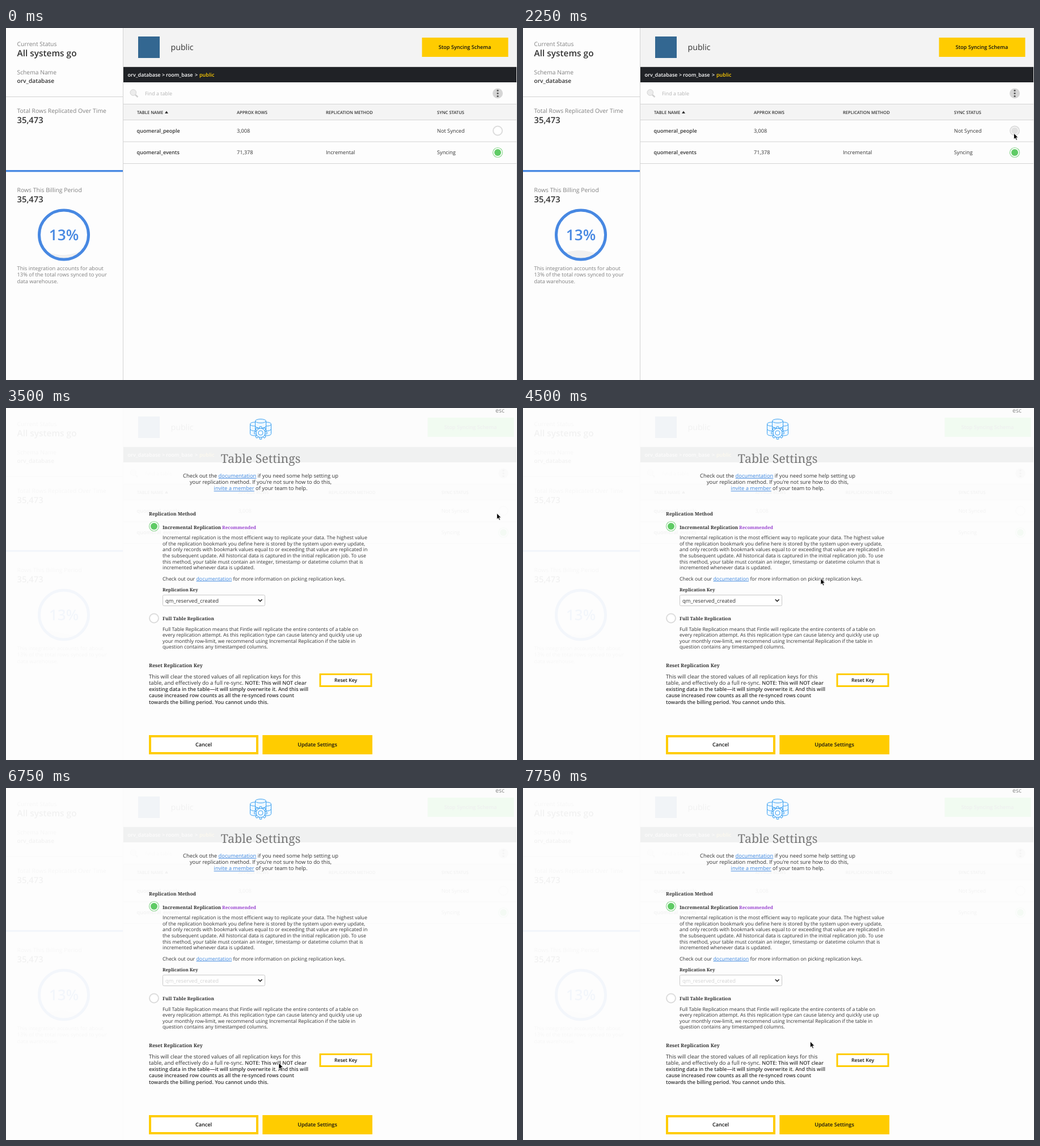
Recreate the animation shown at these times as an HTML page. Size 901 by 622 pixels, loop 8 s.

```html
<!DOCTYPE html>
<html lang="en">
<head>
<meta charset="utf-8">
<title>Table settings</title>
<style>
html, body { margin: 0; width: 100%; height: 100%; overflow: hidden; background: #fdfdfd; }
svg { display: block; width: 100%; height: 100%; }
text { font-family: "Open Sans", "Noto Sans", sans-serif; fill: #333; text-rendering: geometricPrecision; white-space: pre; }
.bold { font-weight: 600; }
.slab { font-family: "Noto Serif", serif; font-weight: 700; }
.title { font-family: "Noto Serif", serif; fill: #777; }
.soft { fill: #808080; }
.faint { fill: #b4b4b4; }
.pale { fill: #d2d2d2; }
.mid { text-anchor: middle; }
.black { fill: #111; }
.link { fill: #3b86e0; text-decoration: underline; }
</style>
</head>
<body>
<svg id="stage" viewBox="0 0 901 622"></svg>
<script>
const LOOP = 8000, STEP = 250;
const BLUE = '#4788e2', GREEN = '#5fcb65', YELLOW = '#fc0';

const text = (x, y, size, str, cls = '', extra = '') =>
  `<text x="${x}" y="${y}" font-size="${size}" class="${cls}" ${extra}>${str}</text>`;
const lines = (x, y, size, pitch, rows, cls) =>
  rows.map((row, i) => text(x, y + i * pitch, size, row, cls)).join('');
const rect = (x, y, w, h, fill, extra = '') =>
  `<rect x="${x}" y="${y}" width="${w}" height="${h}" fill="${fill}" ${extra}/>`;
const circle = (x, y, r, fill, extra = '') =>
  `<circle cx="${x}" cy="${y}" r="${r}" fill="${fill}" ${extra}/>`;
const path = (d, extra) => `<path d="${d}" ${extra}/>`;
const group = (id, body) => `<g id="${id}">${body}</g>`;
const link = str => `<tspan class="link">${str}</tspan>`;

const radio = (x, y, on) => on
  ? circle(x, y, 8.5, '#fff', 'stroke="#8ed692" stroke-width="1.2"') + circle(x, y, 6, GREEN)
  : circle(x, y, 8, '#fff', 'stroke="#dcdcdc" stroke-width="2"');

function dashboard(shift, buttonFill) {
  const col = x => x + (x - 231) * shift * 0.00145;
  const right = x => x + shift;
  const rowLine = y => rect(207, y, 694, 1, '#d4d4d4');
  const row = (y, name, count, method, status, on) =>
    text(230.5, y + 3.2, 9.1, name, 'bold') + text(col(407), y + 3.2, 9.2, count) +
    text(col(564), y + 3.2, 9.2, method) + text(col(760), y + 3.2, 9.2, status) +
    radio(right(867), y, on);
  const head = (x, str) => text(col(x), 151.6, 7.6, str, 'bold');
  const crumb = (x, str, fill = '#fff') => text(x, 85.5, 9, str, 'bold', `style="fill:${fill}"`);

  return rect(207, 0, 693, 68, '#f3f3f3') + rowLine(68) +
    rect(233, 15, 38, 38, '#336791') + text(290.5, 39, 14.2, 'public') +
    rect(right(733.5), 17, 152, 34, buttonFill) +
    text(right(809), 37.2, 9.1, 'Stop Syncing Schema', 'bold black mid') +
    rect(207, 69, 693, 27, '#202226') +
    crumb(214.5, 'orv_database') + crumb(275, '&gt;') + crumb(282, 'room_base') +
    crumb(333, '&gt;') + crumb(341, 'public', YELLOW) +
    path('M228 118L232.5 122', 'stroke="#d0d0d0" stroke-width="2.4"') +
    circle(224.3, 114, 5.3, '#ececec', 'stroke="#d4d4d4"') +
    text(245, 118.6, 8.9, 'Find a table', 'faint') +
    circle(right(867), 115.5, 9, '#d6d6d6') +
    [110.5, 115.5, 120.5].map(y => circle(right(867), y, 1.6, '#555')).join('') +
    rect(207, 135, 693, 27, '#f4f4f4') + [134, 162, 200.5, 239].map(rowLine).join('') +
    head(231, 'TABLE NAME') + path('M280 151L283 146.5L286 151Z', 'fill="#333"') +
    head(407, 'APPROX ROWS') + head(564, 'REPLICATION METHOD') + head(760, 'SYNC STATUS') +
    row(181.5, 'quomeral_people', '3,008', '', 'Not Synced', false) +
    row(220, 'quomeral_events', '71,378', 'Incremental', 'Syncing', true) +
    rect(206, 0, 1, 622, '#d4d4d4') + rect(900, 0, 1, 622, '#dcdcdc') +
    text(19.5, 32, 10.4, 'Current Status', 'soft') + text(19.5, 50, 15.4, 'All systems go', 'bold') +
    text(19.5, 81.5, 10.3, 'Schema Name', 'soft') + text(19.5, 96.5, 10.2, 'orv_database', 'bold') +
    rect(0, 121, 206, 1, '#d4d4d4') +
    text(19.5, 150, 10.4, 'Total Rows Replicated Over Time', 'soft') +
    text(19.5, 168, 14.8, '35,473', 'bold') +
    rect(0, 251, 206, 3.3, BLUE) +
    text(19.5, 290, 10.4, 'Rows This Billing Period', 'soft') +
    text(19.5, 307.5, 14.8, '35,473', 'bold') +
    path('', 'class="wave" fill="#f0f0f0" clip-path="url(#dial)"') +
    circle(102, 365.5, 43.5, 'none', `stroke="${BLUE}" stroke-width="5"`) +
    text(102, 375, 26.2, '13%', 'bold mid', `style="fill:${BLUE}"`) +
    lines(19.5, 428, 9.35, 11.3, ['This integration accounts for about',
      '13% of the total rows synced to your', 'data warehouse.'], 'soft');
}

function databaseIcon() {
  const drum = (x, y, rx, h) => {
    const front = `a${rx} 3.4 0 0 0 ${2 * rx} 0`;
    return path(`M${x - rx} ${y}v${h}${front}v${-h}a${rx} 3.4 0 0 0 ${-2 * rx} 0${front}` +
      `M${x - rx} ${y + h / 2}${front}`, '');
  };
  const teeth = [0, 45, 90, 135, 180, 225, 270, 315].map(a =>
    path('M446.8 36.2l.6 -3.4h3.2l.6 3.4', `transform="rotate(${a} 449 44)"`)).join('');
  return `<g fill="#eef8ff" stroke="#3aa0f2">${drum(437.5, 28.5, 7, 17)}` +
    `${drum(460.5, 28.5, 7, 17)}${drum(449, 23, 9.5, 18)}${teeth}` +
    `${circle(449, 44, 8, '#eef8ff')}${circle(449, 44, 4, '#fff')}</g>`;
}

const actions = y =>
  rect(254, y + 2, 189, 30, '#fff', `stroke="${YELLOW}" stroke-width="4"`) +
  text(348.5, y + 20.3, 9.1, 'Cancel', 'bold black mid') +
  rect(452.3, y, 193.7, 34, YELLOW) + text(549, y + 20.3, 9.1, 'Update Settings', 'bold black mid');

const modal = () =>
  databaseIcon() + text(449, 97, 21.3, 'Table Settings', 'title mid') +
  lines(449, 122.8, 9.35, 11.3, [
    `Check out the ${link('documentation')} if you need some help setting up`,
    "your replication method. If you're not sure how to do this,",
    `${link('invite a member')} of your team to help.`], 'mid') +
  text(252, 189.5, 8.4, 'Replication Method', 'slab') +
  text(276, 213.5, 8.4, 'Incremental Replication', 'slab') +
  text(381, 213.5, 8, 'Recommended', 'slab', 'style="fill:#9a45d0"') +
  lines(276, 232.2, 8.78, 10.62, [
    'Incremental replication is the most efficient way to replicate your data. The highest value',
    'of the replication bookmark you define here is stored by the system upon every update,',
    'and only records with bookmark values equal to or exceeding that value are replicated in',
    'the subsequent update. All historical data is captured in the initial replication job. To use',
    'this method, your table must contain an integer, timestamp or datetime column that is',
    'incremented whenever data is updated.']) +
  text(276, 304.7, 8.78, `Check out our ${link('documentation')} for more information on picking replication keys.`) +
  text(276, 324, 7.9, 'Replication Key', 'slab') +
  rect(276.5, 330.5, 180, 19, '#fff', 'rx="2" stroke="#c8c8c8"') +
  path('M444.8 338.2L448.2 341.6L451.6 338.2', 'fill="none" stroke="#222" stroke-width="1.6"') +
  text(276, 375, 8.2, 'Full Table Replication', 'slab') +
  lines(276, 393.5, 8.78, 10.62, [
    'Full Table Replication means that Fintle will replicate the entire contents of a table on',
    'every replication attempt. As this replication type can cause latency and quickly use up',
    'your monthly row-limit, we recommend using Incremental Replication if the table in',
    'question contains any timestamped columns.']) +
  group('loading', radio(261, 209, false) + radio(261, 371.5, true) +
    text(281, 343.8, 9.25, 'Select a Column', 'soft') + actions(470)) +
  group('loaded', radio(261, 209, true) + radio(261, 371.5, false) +
    text(281, 343.8, 9.4, 'qm_reserved_created', '', 'id="value"') +
    text(252, 458.3, 8.7, 'Reset Replication Key', 'slab') +
    text(252, 477.8, 9.55, 'This will clear the stored values of all replication keys for this') +
    text(252, 489, 9.55, 'table, and effectively do a full re-sync. ' +
      '<tspan class="bold" font-size="9">NOTE: This will NOT clear</tspan>') +
    lines(252, 500.2, 9.02, 11.2, [
      'existing data in the table—it will simply overwrite it. And this will',
      'cause increased row counts as all the re-synced rows count',
      'towards the billing period. You cannot undo this.'], 'bold') +
    rect(554, 470.5, 90, 21, '#fff', `stroke="${YELLOW}" stroke-width="3"`) +
    text(599, 483.8, 8.6, 'Reset Key', 'bold black mid') + actions(578));

const menu = () =>
  path('M276.5 356.5H292L297 351L302 356.5H426.5V399.5H276.5Z', 'fill="#fff" stroke="#e2e2e2"') +
  rect(277, 361, 149, 35.5, YELLOW) +
  text(289, 376.2, 8.6, 'qm_reserved_created', 'bold black') +
  text(414, 386.8, 8.3, 'TIMESTAMP', 'bold', 'text-anchor="end" style="fill:#8c7a45"');

document.getElementById('stage').innerHTML =
  `<defs><clipPath id="dial">${circle(102, 365.5, 42, '#000')}</clipPath></defs>` +
  group('page', dashboard(0, YELLOW) + circle(867, 181.5, 6, '#e2e2e2', 'id="hover"')) +
  group('ghost', dashboard(10, '#2d3')) +
  group('modal', modal()) +
  text(863, 8, 10.5, 'esc', 'soft', 'id="esc"') +
  rect(424, 362, 60, 60, '#202226', 'id="loader"') +
  group('menu', menu()) +
  path('M0 0V10.6L2.5 8.4L4.2 12.2L5.9 11.4L4.2 7.7H7.5Z',
    'id="cursor" fill="#000" stroke="#fff" stroke-width=".7"');

const el = id => document.getElementById(id);
const show = (id, on) => { el(id).style.display = on ? '' : 'none'; };

// time, x, y
const track = [[250, 666, 404], [1250, 783, 208], [2250, 865.5, 186], [3750, 865.5, 186],
  [4750, 411.5, 340], [5750, 411.5, 340], [6500, 478, 598], [6750, 481, 486],
  [7250, 500, 460], [7750, 506.5, 448]];

function cursorAt(t) {
  const i = track.findIndex(key => key[0] > t);
  if (i < 0) return track[track.length - 1].slice(1);
  if (i === 0) return track[0].slice(1);
  const [t0, x0, y0] = track[i - 1], [t1, x1, y1] = track[i];
  const k = (t - t0) / (t1 - t0);
  return [x0 + (x1 - x0) * k, y0 + (y1 - y0) * k];
}

function wave(t) {
  let d = 'M56 412';
  for (let x = 56; x <= 148; x += 4) d += `L${x} ${(397 + 4 * Math.sin(x / 16 + 1.6 + t / 700)).toFixed(1)}`;
  return d + 'L148 412Z';
}

function render(now) {
  const t = Math.floor(now % LOOP / STEP) * STEP;
  const open = t >= 2750, loaded = t >= 3250, fading = t < 3000;
  show('page', !open);
  ['ghost', 'modal', 'esc'].forEach(id => show(id, open));
  show('hover', t >= 2000);
  show('loader', open && !loaded);
  show('loading', !loaded);
  show('loaded', loaded);
  show('menu', t >= 4750 && t < 6000);
  show('cursor', t >= 250);
  el('ghost').setAttribute('opacity', fading ? 0.03 : 0.05);
  el('modal').setAttribute('opacity', fading ? 0.5 : 1);
  el('value').setAttribute('class', t >= 4750 ? 'pale' : '');
  el('cursor').setAttribute('transform', `translate(${cursorAt(t)})`);
  document.querySelectorAll('.wave').forEach(w => w.setAttribute('d', wave(t)));
  requestAnimationFrame(() => render(performance.now()));
}
render(0);
</script>
</body>
</html>
```
